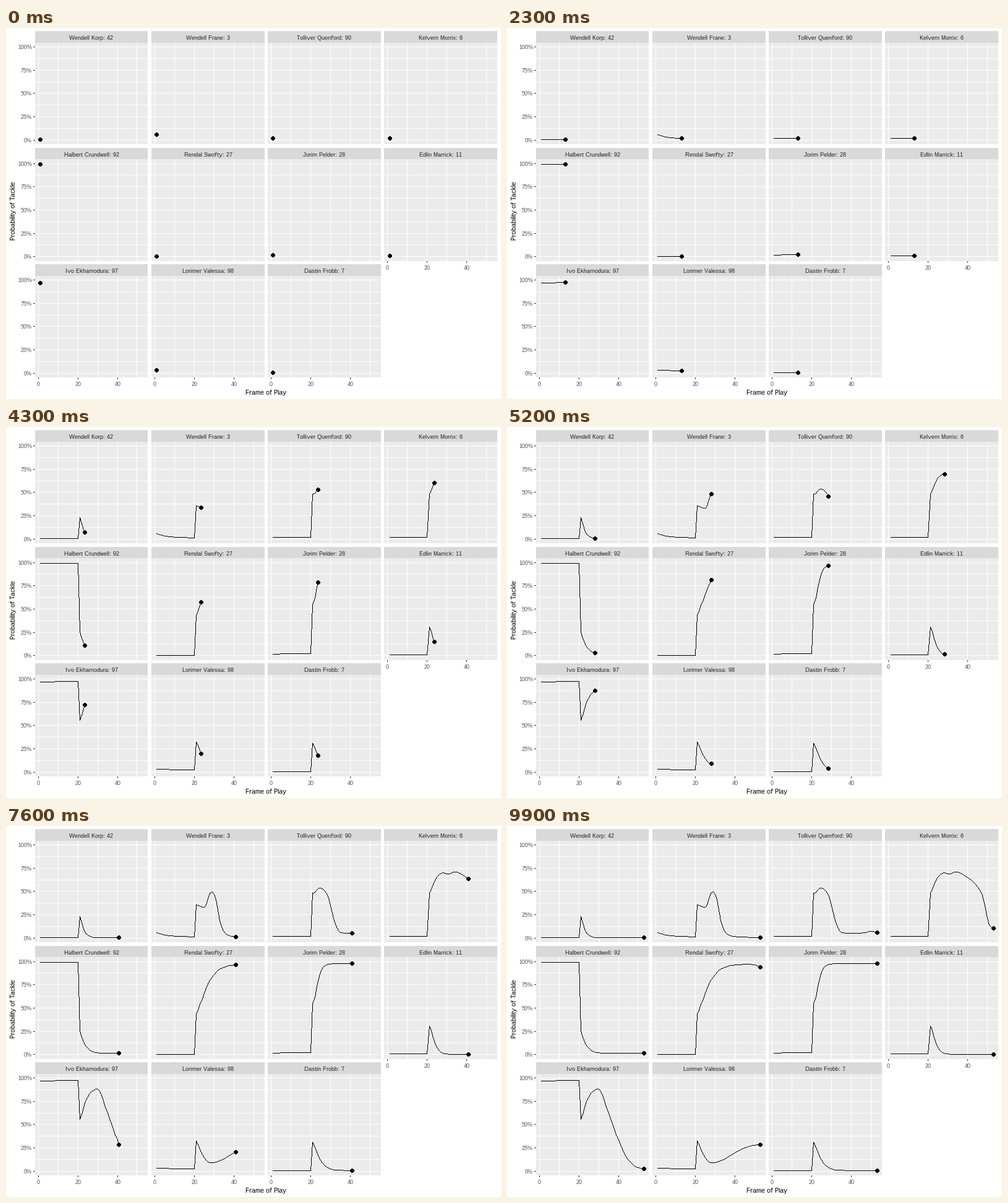
Recreate the animation shown at these times as a matplotlib script. Size 800x600 px, loop 10 s.

```python
import numpy as np
import matplotlib.pyplot as plt
from matplotlib.animation import FuncAnimation
from matplotlib.patches import Rectangle

W, H, DPI = 800, 600, 100
FRAMES, INTERVAL = 100, 100
FIRST, LAST, SNAP = 1, 53, 20

plt.rcParams.update({"font.family": "Liberation Sans",
                     "text.hinting": "native", "text.hinting_factor": 1})

# Panel geometry in pixels, y pointing down
LEFT, COL_STEP, PANEL_W = 46.6, 188.25, 182.75
STRIP_TOP, PANEL_TOP, ROW_STEP, PANEL_H = 5.2, 23.6, 188.565, 164.6
X_MIN, X_SPAN = -1.6, 57.2
ZERO, FULL = 157.17, 150.8

plays = np.arange(FIRST, LAST + 1)
panels = []


def settle(s, a, b, tau, p=1):
    """Ease from a to b; p sets how sudden the change is."""
    return b + (a - b) * np.exp(-(s / tau) ** p)


def bump(s, height, centre, width):
    return height * np.exp(-np.abs((s - centre) / width) ** 2.5)


def player(name, number, start, end, after):
    """Percent per play: a calm drift, then after(s) once the play breaks."""
    calm = settle(plays - FIRST, start, end, 6)
    live = after(np.maximum(plays - SNAP - 1, 0))
    panels.append((f"{name}: {number}", np.where(plays <= SNAP, calm, live)))


player("Wendell Korp", 42, .8, .8, lambda s: settle(s, 23, .4, 2.2, 1.3))
player("Wendell Frane", 3, 5.5, 1.2,
       lambda s: settle(s, 35.5, .8, 10, 2) + bump(s, 31, 8.6, 3.2))
player("Tolliver Quenford", 90, 2, 2,
       lambda s: settle(s, 54, 5.4, 10.4, 4.9) - bump(s, 6, 0, 2) + bump(s, 1.8, 29, 3))
player("Kelvern Morrix", 6, 2, 2,
       lambda s: settle(s, 48, 73.5, 3.5, 1.3) - bump(s, 3.5, 9.5, 2.5)
       - settle(s, 0, 30, 25, 4) - settle(s, 0, 35, 28.4, 20))
player("Halbert Crundwell", 92, 99, 99, lambda s: settle(s, 25.5, 1.3, 2.8, 1.1))
player("Rendal Swofty", 27, .2, .2,
       lambda s: settle(s, 43, 97, 6.3, 1.3) - bump(s, 4, 34, 4))
player("Jorim Pelder", 28, 1.5, 2.3, lambda s: settle(s, 54.5, 97.5, 2.95, 1.5))
player("Edlin Marrick", 11, 1, 1, lambda s: settle(s, 30.7, .4, 3.1, 1.5))
player("Ivo Ekhamodura", 97, 96.6, 97.3,
       lambda s: settle(s, 55.5, 95, 3.9, 1.4) - settle(s, 0, 93, 18.5, 3)
       + bump(s, 5, 10, 2.5))
player("Lorimer Valessa", 98, 3.5, 2.6,
       lambda s: settle(s, 32.2, 7, 3.4, 1.5) + settle(s, 0, 22, 20, 3))
player("Dastin Frobb", 7, .8, .8, lambda s: settle(s, 31, .8, 3.9, 1.25))

fig = plt.figure(figsize=(W / DPI, H / DPI), dpi=DPI, facecolor="white")
ax = fig.add_axes([0, 0, 1, 1])
ax.set(xlim=(0, W), ylim=(H, 0))
ax.axis("off")


def to_x(col, t):
    x = LEFT + col * COL_STEP + (np.asarray(t) - X_MIN) / X_SPAN * PANEL_W
    return np.rint(x).astype(int)


def to_y(row, pct):
    y = PANEL_TOP + row * ROW_STEP + ZERO - np.asarray(pct) / 100 * FULL
    return np.rint(y).astype(int)


def box(x0, y0, x1, y1, color):
    ax.add_patch(Rectangle((x0, y0), x1 - x0, y1 - y0, fc=color, lw=0, aa=False))


def label(x, y, s, size, color="black", ha="center", **kw):
    ax.text(x, y, s, fontsize=size * 72 / DPI, color=color, ha=ha, va="baseline", **kw)


def draw_panel(i, title):
    row, col = divmod(i, 4)
    x0 = round(LEFT + col * COL_STEP)
    x1 = round(LEFT + col * COL_STEP + PANEL_W)
    strip = round(STRIP_TOP + row * ROW_STEP)
    y0 = round(PANEL_TOP + row * ROW_STEP)
    y1 = round(PANEL_TOP + row * ROW_STEP + PANEL_H)
    box(x0, strip, x1, y0, "#D9D9D9")
    box(x0, y0, x1, y1, "#EBEBEB")
    label((x0 + x1) / 2, strip + 14, title, 9, "#1A1A1A")

    for pct in np.arange(0, 101, 12.5):
        y = to_y(row, pct)
        box(x0, y, x1, y + 1, "white")
        if col == 0 and pct % 25 == 0:
            box(x0 - 3, y, x0, y + 1, "#333333")
            label(42, y + 4, f"{pct:.0f}%", 9, "#4D4D4D", "right")
    for t in range(0, 51, 10):
        x = to_x(col, t)
        box(x, y0, x + 1, y1, "white")
        if i + 4 >= len(panels) and t % 20 == 0:
            box(x, y1, x + 1, y1 + 3, "#333333")
            label(x + .5, y1 + 14, str(t), 9, "#4D4D4D")


for i, (title, _) in enumerate(panels):
    draw_panel(i, title)
label(420, 593, "Frame of Play", 11)
label(15, 295.5, "Probability of Tackle", 11, rotation=90, rotation_mode="anchor")

# Crisp one-pixel lines and dots go on a transparent layer
ink = np.zeros((H, W, 4), np.uint8)
layer = fig.figimage(ink, origin="upper", zorder=5)
dy, dx = np.mgrid[-3:4, -3:4]
disc = dx ** 2 + dy ** 2 <= 10


def stroke(x, y):
    for x0, x1, y0, y1 in zip(x, x[1:], y, y[1:]):
        n = max(abs(x1 - x0), abs(y1 - y0)) + 1
        cols = np.rint(np.linspace(x0, x1, n)).astype(int)
        rows = np.rint(np.linspace(y0, y1, n)).astype(int)
        ink[rows, cols, 3] = 255


def update(n):
    now = FIRST + (LAST - FIRST) * n / (FRAMES - 1)
    t = np.append(np.arange(FIRST, np.ceil(now - 1e-9)), now)
    ink[:] = 0
    for i, (_, pct) in enumerate(panels):
        row, col = divmod(i, 4)
        x, y = to_x(col, t), to_y(row, np.interp(t, plays, pct))
        stroke(x, y)
        ink[y[-1] + dy[disc], x[-1] + dx[disc], 3] = 255
    layer.set_data(ink)
    return [layer]


anim = FuncAnimation(fig, update, frames=FRAMES, interval=INTERVAL,
                     repeat=True, repeat_delay=0, blit=False)
plt.show()
```
